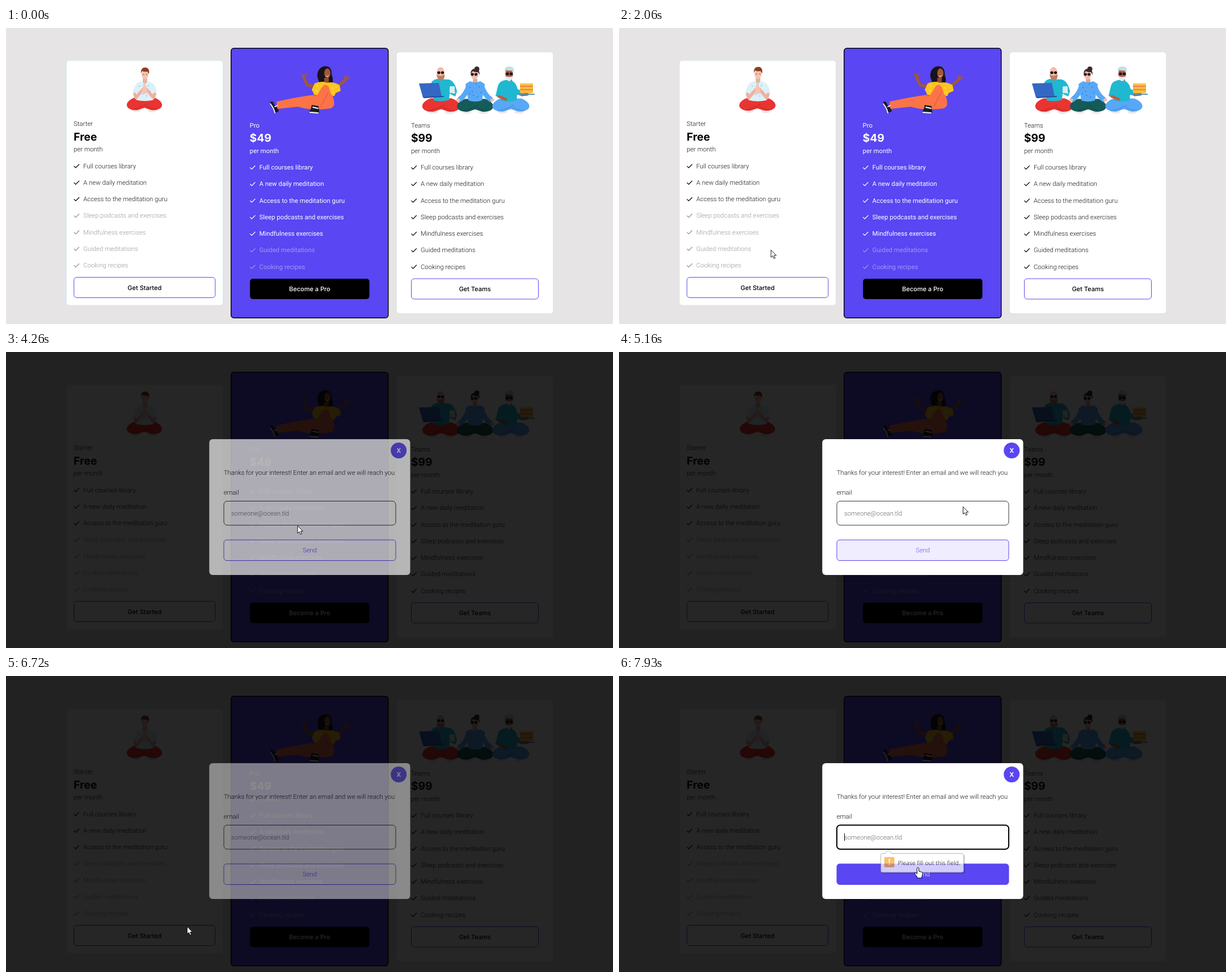
An HTML page for the animation above (8000 ms loop, 1070 by 523 pixels).

```html
<!DOCTYPE html>
<html lang="en">
<head>
<meta charset="utf-8">
<title>Meditation plans</title>
<style>
html, body { margin: 0; width: 100%; height: 100%; overflow: hidden; background: #e6e4e5; }
svg { display: block; width: 100vw; height: 100vh; }
text { font: 300 11.3px Roboto, Inter, sans-serif; text-rendering: geometricPrecision; white-space: pre; }
.pro text { font-weight: 400; }
text.price { font: 700 19.2px Inter, sans-serif; }
text.btn { font: 500 11px Inter, sans-serif; text-anchor: middle; }
.art { transform-box: fill-box; transform-origin: center; }
</style>
</head>
<body>
<svg id="stage" viewBox="0 0 1070 523"></svg>
<script>
const PURPLE = '#5a46f2', LOOP = 8000;

// Drawing helpers
const oval = (x, y, rx, ry, fill) => `<ellipse cx="${x}" cy="${y}" rx="${rx}" ry="${ry}" fill="${fill}"/>`;
const shape = (d, fill, more = '') => `<path d="${d}" fill="${fill}" ${more}/>`;
const line = (d, color, width) => shape(d, 'none',
  `stroke="${color}" stroke-width="${width}" stroke-linecap="round" stroke-linejoin="round"`);
const box = (x, y, w, h, r, fill, stroke = 'none', width = 1, more = '') =>
  `<rect x="${x}" y="${y}" width="${w}" height="${h}" rx="${r}" fill="${fill}" stroke="${stroke}" stroke-width="${width}" ${more}/>`;
const label = (x, y, s, fill, more = '') => `<text x="${x}" y="${y}" fill="${fill}" ${more}>${s}</text>`;
const glasses = (x, y) => oval(x - 3, y, 2.7, 2.4, '#181820') + oval(x + 3.4, y, 2.7, 2.4, '#181820');
const dots = (x, y, color) => [[-9, -8], [-3, 6], [7, -9], [10, 1], [-10, 3], [4, 9], [-5, -1], [2, -14]]
  .map(([a, b]) => oval(x + a, y + b, .9, .9, color)).join('');

const crossedLegs = (x, y, color, size = 1) => `<g transform="translate(${x} ${y}) scale(${size})">`
  + oval(-14, 10, 8, 3.6, '#efe6e4') + oval(14, 10.5, 8, 3.6, '#efe6e4')
  + shape('M-17-12C-24-10-32-4-31 2c1 6 10 9 19 8L0 6l12 4c9 1 18-2 19-8 1-6-7-12-14-14z', color)
  + line('M-22 9Q-6 6 5-1M22 9Q10 7 4 3', '#00000030', 1) + '</g>';

const starterArt = () => crossedLegs(244, 135, '#e93432')
  + shape('M241 89h8v10h-8z', '#eab29e')
  + shape('M238 94l-8 4q-5 8-7 18l7 2-1 9q15 4 31 0l-1-9 7-2q-1-12-7-18l-8-4-7 4z', '#dcf0f8')
  + dots(244, 111, '#6bb7dc')
  + line('M227 117l2 6 13-15M262 117l-2 6-13-15', '#efb0a0', 5.5)
  + shape('M239 114l4-17 1.5-1 5 16-4 5z', '#f4c4b3')
  + oval(245, 82, 6, 8.5, '#f4c4b3')
  + shape('M238 80c-1-8 4-11 9-10 5 1 6 6 5 11l-3-4q-6 1-9-1z', '#8d3f24')
  + line('M241.5 82h2M247 82h2', '#6b3528', .8);

const proArt = () => line('M545 103l-14-2-5-11M584 104l14-12', '#a4573a', 5)
  + line('M525 90l-4-8m4 8v-9m0 9l5-8M597 93l5-9m-5 9l9-6m-9 6l1-9', '#a4573a', 2.2)
  + shape('M551 92c-5-9-1-22 9-24 9-2 15 4 14 14 2 6 4 13-1 18l-16 2q-6-4-6-10z', '#17131a')
  + shape('M561 88h8v10h-8z', '#914a33') + oval(566.5, 80, 5.5, 8.5, '#a4573a')
  + line('M564 85q3 2 5-1', '#fff', 1)
  + shape('M560 95q-11 0-16 3l-5 11 5 10 9 2 26-1 2-5 9-4-2-10q-8-5-17-5-5 2-11-1z', '#fcc51d')
  + line('M548 101l2 2m-3 7l2 2m7-9l2 3m16-1l2 2m5-3l2 1m-8 9l2 1', '#ffe27a', 1.2)
  + shape('M477 130q35-8 66-12h32q8 20-3 24-32 5-58-3l-36 4z', '#fb7447')
  + line('M546 136L563 107L572 134', '#fb7447', 13)
  + line('M555 139l13-25M541 120l6-1', '#d95432', 1)
  + shape('M465 132q3-4 6-1l3 6q5 4 7 10l-6 3q-4-9-10-18z', '#1b1b22')
  + line('M466 134q6 7 8 16M474 139l4-2', '#fff', 1.8)
  + shape('M539 136l12 2q1 6 1 12l-17-2q3-5 4-12z', '#1b1b22')
  + line('M536 149l14 1M541 140l9 2', '#fff', 1.8);

const teamsArt = () => crossedLegs(767, 137, '#e93432', 1.07) + crossedLegs(827, 137.5, '#155b58', 1.03)
  + crossedLegs(890, 137, '#58a8f7', 1.05)
  // with the laptop
  + shape('M762 88h9v7h-9z', '#e5a58f')
  + shape('M759 90q-9 2-10 10l5 28q14 3 27-1l1-11 10 5 3-9q-4-18-14-21z', '#20b8d0')
  + line('M784 111l6 3-4-7', '#f3bda8', 4.5)
  + box(782, 103, 9, 12, 1.5, '#d8eef2')
  + oval(766, 79, 7, 10, '#f3bda8') + shape('M759 82q7 5 14 0 1 9-6 11-7-1-8-11z', '#c27c62') + glasses(766, 79)
  + shape('M728 98l35-1 5 24-33 2z', '#3567c4') + line('M737 123l34-2', '#234a96', 1.8)
  // with the bun
  + line('M816 101q-5 17-16 25M838 101q5 17 16 25', '#58a8f7', 9)
  + shape('M823 90h8v8h-8z', '#e5a58f')
  + shape('M818 94l-8 5 5 29q12 4 24 0l5-29-8-5q-9 4-18 0z', '#58a8f7') + dots(827, 113, '#2f74c4')
  + oval(830, 72.5, 4.5, 4.5, '#3b2830') + oval(826, 82, 6.5, 9, '#f3bda8')
  + shape('M819 81q0-9 8-9 8 0 8 11l-3-5q-7 0-9-2z', '#3b2830') + glasses(825, 82)
  + oval(797, 127, 3.5, 2.5, '#f3bda8') + oval(857, 127, 3.5, 2.5, '#f3bda8')
  // with the cake
  + shape('M883 89h9v7h-9z', '#974632')
  + shape('M880 92q-11 2-13 11l-4 17 9 4 1 4q13 4 27 0l1-10 9 2 1-8-9-4q-3-13-13-16z', '#20b8d0')
  + line('M909 118l10-1M869 121l12 5', '#b85d43', 5)
  + oval(887, 81, 7, 10, '#b85d43')
  + shape('M880 79c-3-9 2-11 8-11 7 0 9 5 6 12l-3-5q-6 1-9-1z', '#c3dfe8')
  + shape('M881 85q6 3 12 0 0 8-6 9-6-1-6-9z', '#e5edf0') + glasses(887, 81)
  + box(906, 97, 23, 18, 2, '#f8bd3c')
  + line('M907 103h21m-21 6h21', '#ec704c', 1.5) + line('M907 98h21', '#ffde83', 2)
  + line('M903 117h28', '#5593bf', 2.2);

// Plan cards
const FEATURES = ['Full courses library', 'A new daily meditation', 'Access to the meditation guru',
  'Sleep podcasts and exercises', 'Mindfulness exercises', 'Guided meditations', 'Cooking recipes'];

function card({ id, x, y, w, h, left, top, name, price, on, action, btnW, art }) {
  const pro = id === 'pro', ink = pro ? '#fff' : '#151515';
  const rows = FEATURES.map((s, i) => {
    const cy = top + 74 + i * 29.25;
    return `<g opacity="${i < on ? 1 : .43}">`
      + line(`M${left + .7} ${cy + .7}l2.8 2.8 6-6`, pro ? '#fff' : '#000', 1.1)
      + label(left + 17, cy + 4, s, ink) + '</g>';
  }).join('');
  const btnY = top + 271;
  return `<g class="${id}">`
    + box(x, y, w, h, 5, pro ? PURPLE : '#fff', pro ? '#060610' : '#d9e9ee', pro ? 1.5 : 1)
    + `<g class="art" id="${id}Art">${art()}</g>`
    + label(left, top + 3.7, name, ink)
    + label(left, top + 29, price, pro ? '#fff' : '#000', 'class="price"')
    + label(left, top + 48.7, 'per month', ink) + rows
    + box(left + .5, btnY, btnW, 36, 5, '#fff', pro ? 'none' : PURPLE, 1, `id="${id}Btn"`)
    + label(left + btnW / 2 + .5, btnY + 22, action, '#000', `class="btn" id="${id}Txt"`) + '</g>';
}

const cards = [
  { id: 'starter', x: 106.5, y: 57.5, w: 276, h: 432.5, left: 119.3, top: 169.5, name: 'Starter',
    price: 'Free', on: 3, action: 'Get Started', btnW: 249, art: starterArt },
  { id: 'pro', x: 396.75, y: 35.75, w: 277, h: 476.5, left: 429.6, top: 172, name: 'Pro',
    price: '$49', on: 5, action: 'Become a Pro', btnW: 210.5, art: proArt },
  { id: 'teams', x: 688.5, y: 42.5, w: 276, h: 462, left: 714, top: 172, name: 'Teams',
    price: '$99', on: 7, action: 'Get Teams', btnW: 224, art: teamsArt }
];

const modal = `<g id="modal">` + box(358.3, 154, 354.2, 240, 6, '#fff')
  + oval(692.2, 174, 14, 14, PURPLE)
  + label(692.2, 178, 'X', '#fff', 'class="btn" style="font-weight:700"')
  + label(383.7, 216.7, 'Thanks for your interest! Enter an email and we will reach you', '#151515')
  + label(383.7, 252, 'email', '#151515')
  + box(384, 263.5, 303, 42.5, 6, 'none', '#333', 1, 'id="field"')
  + label(397, 288.5, 'someone@ocean.tld', '#666')
  + shape('M397.5 278v13.5', 'none', 'id="caret" stroke="#000"')
  + box(384, 332, 303, 36.5, 5, '#fff', PURPLE, 1, 'id="sendBtn"')
  + label(535.5, 354, 'Send', PURPLE, 'id="sendTxt" text-anchor="middle"')
  + `<g id="tip">` + box(463, 315.5, 147, 34, 3, '#0003')
  + shape('M464 313.5h5l5.5-6 5.5 6h124q3.5 0 3.5 3v27.5q0 3-3.5 3h-139.5q-3 0-3-3v-27.5q0-3 3-3z', '#fff', 'stroke="#999"')
  + box(467.5, 320, 18, 18, 1.5, '#f7a93b')
  + label(476.5, 334, '!', '#fff', 'text-anchor="middle" style="font-size:15px;font-weight:700"')
  + label(491.5, 334, 'Please fill out this field.', '#222', `style="font:400 10.3px 'Open Sans',sans-serif"`)
  + '</g></g>';

const cursor = `<g id="cursor">`
  + shape('M0 0v13l3-2.7 2 4.7 2.3-1-2-4.5h4z', '#fff', 'id="arrow" stroke="#000" stroke-width=".9"')
  + shape('M-1.7 1.5Q0-1 1.6 1.5V7l5 1.5q2.2.8 1.7 3.5l-1.5 4.5v2.5H-1.5v-2l-4-5.5q-1-2.5 1.5-2l2.3 2z', '#fff',
    'id="hand" stroke="#000" stroke-linejoin="round"') + '</g>';

document.getElementById('stage').innerHTML = box(0, 0, 1070, 523, 0, '#e6e4e5')
  + cards.map(card).join('') + box(0, 0, 1070, 523, 0, '#000', 'none', 0, 'id="shade" opacity=".85"') + modal + cursor;

// Timing
const $ = id => document.getElementById(id);
const clamp = v => Math.max(0, Math.min(1, v));
const within = (t, spans) => spans.find(([a, b]) => t >= a && t < b);
const FADE = 200;
const hover = (t, spans) => Math.max(...spans.map(([a, b]) => Math.min(clamp((t - a) / FADE), clamp(1 - (t - b) / FADE))));
const mix = (from, to, k) => `color-mix(in srgb, ${to} ${(k * 100).toFixed(1)}%, ${from})`;

// Pointer keys: time, x, y
const path = [[140, 1013, 508], [420, 900, 330], [760, 800, 115], [940, 760, 110], [1250, 560, 112],
  [1420, 500, 115], [1720, 262, 110], [1900, 250, 118], [2060, 268, 392], [2250, 262, 452], [2540, 320, 464],
  [2660, 430, 464], [2880, 641, 464], [2960, 714, 464], [3250, 830, 464], [3434, 714, 462], [3540, 640, 462],
  [3580, 596, 462], [3720, 560, 462], [3920, 560, 462], [4260, 514, 307], [4520, 520, 345], [4760, 520, 350],
  [5000, 560, 330], [5450, 690, 172], [5570, 690, 172], [5700, 660, 210], [5900, 660, 210], [6030, 518, 382],
  [6300, 330, 450], [6480, 319, 443], [6720, 319, 443], [7300, 527, 338], [8000, 527, 338]];

const artHover = { starter: [[1705, 1920]], pro: [[1180, 1440]], teams: [[700, 990]] };
const btnHover = {
  starter: [[2210, 2593], [6260, 6490]], pro: [[2660, 2880], [3540, 3930]],
  teams: [[2960, 3434]], send: [[4430, 4980], [7270, 9000]]
};
const closeHover = [[5420, 5570]];
const opened = [[3930, 5570], [6490, 9000]];

function pointer(t) {
  const i = Math.max(1, path.findIndex(k => k[0] > t));
  const [a, x, y] = path[i - 1], [b, u, v] = path[i], k = clamp((t - a) / (b - a));
  return [x + (u - x) * k, y + (v - y) * k];
}

const show = (id, on) => $(id).setAttribute('visibility', on ? 'visible' : 'hidden');

function draw(t) {
  for (const id in artHover) $(id + 'Art').style.transform = `scale(${1 + .1 * hover(t, artHover[id])})`;
  for (const id in btnHover) {
    const k = hover(t, btnHover[id]), pro = id === 'pro';
    $(id + 'Btn').style.fill = pro ? mix('#000', '#2b2b2b', k) : mix('#fff', PURPLE, k);
    $(id + 'Txt').style.fill = pro ? '#fff' : mix(id === 'send' ? PURPLE : '#000', '#fff', k);
  }
  const span = within(t, opened);
  show('shade', span);
  $('modal').setAttribute('opacity', span ? clamp((t - span[0]) / 500) : 0);

  const focused = t >= 7730;
  $('field').setAttribute('stroke', focused ? '#000' : '#333');
  $('field').setAttribute('stroke-width', focused ? 2 : 1);
  show('caret', focused);
  $('tip').setAttribute('opacity', clamp((t - 7750) / 250));

  const hand = within(t, [...Object.values(btnHover).flat(), ...closeHover]), seen = t >= 140;
  $('cursor').setAttribute('transform', `translate(${pointer(t)})`);
  show('arrow', seen && !hand);
  show('hand', seen && hand);
}

const start = performance.now();
(function tick() {
  draw((performance.now() - start) % LOOP);
  requestAnimationFrame(tick);
})();
</script>
</body>
</html>
```
